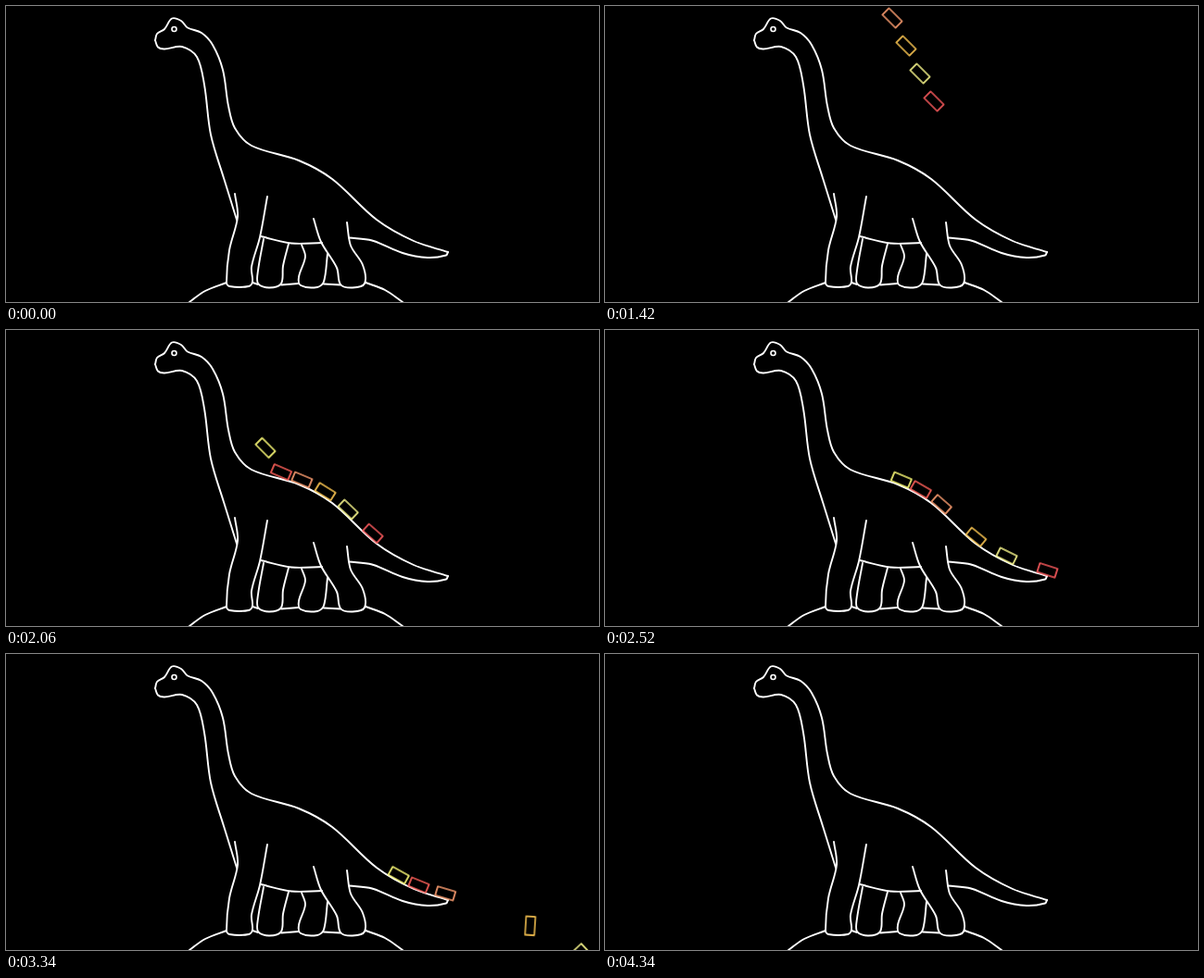
These frames come from a looping animation (640 by 320 pixels, 4680 ms). An HTML page:

```html
<!DOCTYPE html>
<html lang="en">
<head>
<meta charset="utf-8">
<title>Sliding bricks</title>
<style>
  html, body { margin: 0; width: 100%; height: 100%; overflow: hidden; background: #000; }
  svg { display: block; width: 640px; height: 320px; }
  svg * { fill: none; stroke-linecap: round; stroke-linejoin: round; }
  #dino { stroke: #fff; stroke-width: 1.9; }
  #bricks { stroke-width: 1.7; }
</style>
</head>
<body>
<svg viewBox="0 0 640 320">
  <g id="dino"><circle cx="181.5" cy="25" r="2.5" stroke-width="1.6"/></g>
  <g id="bricks"></g>
</svg>
<script>
const LOOP = 4680, STEP = 20;
const HALF_G = 0.00007825;   // half of gravity, px per ms²
const TIP = 476;             // where bricks leave the tail
const SPEED = 0.235;         // sideways speed in the air, px per ms
const GAP = 6;               // brick centre above the back

const back = '161,37 163,30 171,25 179,13.5 189,16 196,23.5 211,29 223,42 234,69 240,108 247,132 265,151 316,167 352,187 400,231 440,254 477,266';
const lines = [
  '477,266 475,269.5 455,272 428,267 395,253.5 370,250.5',                  // under the tail
  '161,37 164,44.5 171,46.5 190,44 206,55 214,85 221,139 235,186 249,231',  // throat
  '247,203 250,228 241,264 238,299 241,303 262,303 266,298 265,282 274,250 282,206',
  '275,249 308,256.5 341,256',                                              // belly
  '278,252 272,286 272,300 284,304.5 297,300 299,281 305,257',
  '319,258 323,271 316,293 318,302 336,304 343,298 347,268',
  '332,230 340,255 357,283 361,301 374,304.5 387,300 385,280 372,259 368,234',
  '198,320 215,308 238,299', '266,299 272,301', '297,301.5 316,300',        // ground
  '343,300.5 361,301.5', '388,299 409,307 428,320'
];

// slide: ms spent on the back; drop: downward speed at the tip; spin: degrees per ms
const bricks = [
  { color: '#f9595c', slide: 790, drop: 0.06, spin: 0.13 },
  { color: '#f7f68a', slide: 943, drop: 0.06, spin: 0.2 },
  { color: '#fcc652', slide: 1083, drop: 0.06, spin: 0.2 },
  { color: '#fc9d70', slide: 1395, drop: 0.08, spin: 0.2 },
  { color: '#fb5f58', slide: 1478, drop: 0.01, spin: 0.2 },
  { color: '#f7f674', slide: 1519, drop: 0.07, spin: 0.3 }
];

const mix = (a, b, k) => a + (b - a) * k;

function svg(parent, tag, attrs) {
  const el = document.createElementNS('http://www.w3.org/2000/svg', tag);
  for (const name in attrs) el.setAttribute(name, attrs[name]);
  return document.getElementById(parent).appendChild(el);
}

// Smooth curve through all points, tangents scaled by distance
function curve(text) {
  const p = text.split(' ').map(s => s.split(',').map(Number));
  const dist = (a, b) => Math.hypot(b[0] - a[0], b[1] - a[1]);
  const slope = i => {
    const a = p[i - 1] || p[i], b = p[i + 1] || p[i];
    const d = dist(a, p[i]) + dist(p[i], b);
    return [(b[0] - a[0]) / d, (b[1] - a[1]) / d];
  };
  let d = 'M' + p[0];
  for (let i = 0; i < p.length - 1; i++) {
    const third = dist(p[i], p[i + 1]) / 3, s = slope(i), e = slope(i + 1);
    const c1 = p[i].map((v, j) => v + s[j] * third);
    const c2 = p[i + 1].map((v, j) => v - e[j] * third);
    d += `C${c1} ${c2} ${p[i + 1]}`;
  }
  return svg('dino', 'path', { d });
}

// Places of a brick's centre along the back
function trackOf(path) {
  const track = [];
  for (let s = 0.5; s < path.getTotalLength() - 0.5; s += 0.2) {
    const a = path.getPointAtLength(s - 0.5), b = path.getPointAtLength(s + 0.5);
    const turn = Math.atan2(b.y - a.y, b.x - a.x);
    track.push({
      x: (a.x + b.x) / 2 + GAP * Math.sin(turn),
      y: (a.y + b.y) / 2 - GAP * Math.cos(turn),
      angle: turn * 180 / Math.PI
    });
  }
  return track;
}

lines.forEach(curve);
const track = trackOf(curve(back));
const onBack = x => track.find(p => p.x >= x) || track[track.length - 1];
const tip = onBack(TIP);

function pose({ slide, drop, spin }, i, t) {
  const x0 = 355 - 15 * i, y0 = -55 - 30 * i;
  const hitY = onBack(x0).y - 4;              // a corner touches first
  const land = Math.sqrt((hitY - y0) / HALF_G);
  if (t < land) return [x0, y0 + HALF_G * t * t, 45];

  const u = (t - land) / slide;
  if (u < 1) {
    const x = mix(x0, TIP, 0.75 * u + 0.25 * u ** 3);
    const flat = Math.min(1, (t - land) / 30);
    const p = onBack(x);
    return [x, mix(hitY, p.y, flat), mix(45, p.angle, flat)];
  }

  const s = t - land - slide;
  return [TIP + SPEED * s, tip.y + drop * s + HALF_G * s * s, tip.angle + spin * s];
}

bricks.forEach((b, i) => {
  const el = svg('bricks', 'rect', { x: -10, y: -5, width: 20, height: 10, stroke: b.color });
  const frames = [];
  for (let t = 0; t <= LOOP; t += STEP) {
    const [x, y, angle] = pose(b, i, t);
    frames.push({ transform: `translate(${x}px, ${y}px) rotate(${angle}deg)` });
  }
  el.animate(frames, { duration: LOOP, iterations: Infinity });
});
</script>
</body>
</html>
```
